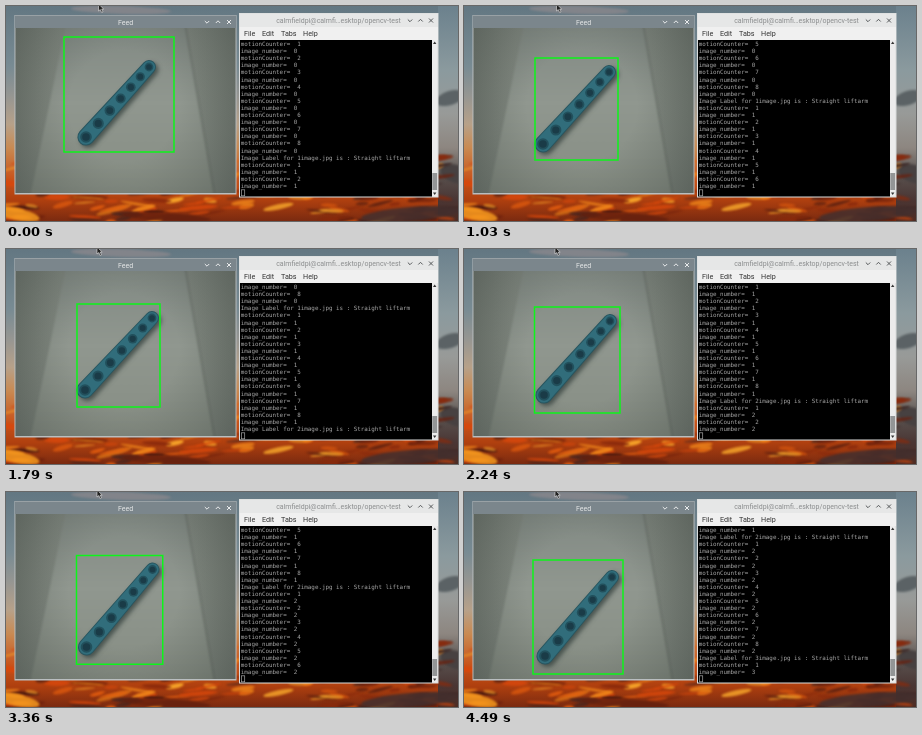
An HTML page with a canvas that plays this animation: 452x215 px, repeating every 4.55 s.

```html
<!DOCTYPE html>
<html lang="en">
<head>
<meta charset="utf-8">
<title>Motion feed</title>
<style>
html, body { margin: 0; width: 100%; height: 100%; overflow: hidden; background: #6f8088; }
canvas { display: block; width: 452px; height: 215px; }
</style>
</head>
<body>
<canvas id="stage" width="452" height="215"></canvas>
<script>
const W = 452, H = 215, LOOP = 4550;
const ctx = document.getElementById('stage').getContext('2d');
const UI = 'Roboto, "Open Sans", sans-serif';
const MONO = '"DejaVu Sans Mono", "Liberation Mono", monospace';

// Console output: eight counts per picture, then a slower labelling step.
// Each count is one camera frame, so the feed refreshes on the same ticks.
const STEP = 245, LABEL = 300;
const log = [], ticks = [];
let clock = 223 - STEP * 10 - LABEL;
for (let n = 0; n < 4; n++) {
  for (let k = 1; k <= (n < 3 ? 8 : 1); k++) {
    log.push({ at: clock, text: 'motionCounter=  ' + k });
    log.push({ at: clock, text: 'image_number=  ' + n });
    ticks.push(clock);
    clock += STEP;
  }
  if (n < 3) {
    clock += LABEL - STEP;
    log.push({ at: clock, text: `Image Label for ${n + 1}image.jpg is : Straight liftarm` });
    clock += STEP;
  }
}

// tick, detection box (left, top, right, bottom), arm ends (low x, y, high x, y)
const poses = [
  [9, 58, 31, 168, 146, 80, 131, 143, 61],
  [10, 71, 47, 154, 148, 80, 133, 144, 62],
  [13, 71, 52, 154, 154, 79, 138, 145, 66],
  [15, 71, 55, 154, 158, 79, 141, 146, 69],
  [17, 70.5, 58, 156, 164, 80, 146, 146, 72],
  [19, 71, 62, 155.5, 169.5, 80, 152, 146, 76],
  [23, 70, 65, 158, 175, 81, 158, 147, 79],
  [24, 69, 68, 159, 182, 81, 164, 148, 85]
].map(([i, ...p]) => [ticks[i], ...p]);

function poseAt(t) {
  const now = ticks.filter(at => at <= t).pop();
  const i = poses.findIndex(p => p[0] > now);
  if (i < 0) return poses[poses.length - 1].slice(1);
  const a = poses[i - 1], b = poses[i];
  const u = (now - a[0]) / (b[0] - a[0]);
  return a.map((v, k) => v + (b[k] - v) * u).slice(1);
}

function layer(paint) {
  const c = document.createElement('canvas');
  c.width = W;
  c.height = H;
  paint(c.getContext('2d'));
  return c;
}

function ramp(g, x0, y0, x1, y1, stops) {
  const grad = g.createLinearGradient(x0, y0, x1, y1);
  stops.forEach(([p, c]) => grad.addColorStop(p, c));
  return grad;
}

function rect(g, x, y, w, h, fill) {
  g.fillStyle = fill;
  g.fillRect(x, y, w, h);
}

function poly(g, pts, fill) {
  g.beginPath();
  pts.forEach(([x, y]) => g.lineTo(x, y));
  g.closePath();
  g.fillStyle = fill;
  g.fill();
}

function label(g, text, x, y, size, color, family = UI, align = 'left') {
  g.font = `${size}px ${family}`;
  g.textAlign = align;
  g.fillStyle = color;
  g.fillText(text, x, y);
}

function buttons(g, xs, y, color) {
  g.strokeStyle = color;
  g.lineWidth = 1;
  g.beginPath();
  [[xs[0], 1], [xs[1], -1]].forEach(([x, s]) => {
    g.moveTo(x - 2.2, y - s);
    g.lineTo(x, y + s * 1.2);
    g.lineTo(x + 2.2, y - s);
  });
  const x = xs[2];
  g.moveTo(x - 2, y - 2);
  g.lineTo(x + 2, y + 2);
  g.moveTo(x + 2, y - 2);
  g.lineTo(x - 2, y + 2);
  g.stroke();
}

function sky(g) {
  rect(g, 0, 0, W, H, ramp(g, 0, 0, 0, H, [
    [0, '#637782'], [0.28, '#788b93'], [0.42, '#969692'], [0.55, '#b7a189'],
    [0.66, '#c98a52'], [0.8, '#c9551c'], [0.9, '#b0400f'], [1, '#7a2a10']
  ]));
  rect(g, 432, 0, 20, H, ramp(g, 0, 0, 0, H, [
    [0, '#6b818d'], [0.3, '#8b9a9e'], [0.5, '#989a98'], [0.66, '#8d8680'],
    [0.78, '#5a5350'], [0.9, '#4a3634'], [1, '#4d2c24']
  ]));

  let seed = 41;
  const rnd = () => (seed = (seed * 16807) % 2147483647) / 2147483647;
  const cloud = (x, y, rx, ry, tilt, fill) => {
    g.beginPath();
    g.ellipse(x, y, rx, ry, tilt, 0, Math.PI * 2);
    g.fillStyle = fill;
    g.fill();
  };
  g.filter = 'blur(.8px)';
  cloud(115, 4, 50, 4, 0.03, '#82848a');
  cloud(444, 92, 15, 7, -0.3, '#5b6265');
  cloud(450, 168, 16, 9, 0.3, '#474141');

  // Streaks run from bright on the left to dark on the right
  const bright = ['#f2881a', '#e85f0e', '#f7a52a', '#d8480c'];
  const dark = ['#4a1a10', '#6b1e0c', '#3a2422', '#8a2a0c'];
  for (let i = 0; i < 200; i++) {
    const x = rnd() * 436, y = 150 + rnd() * 68;
    const set = rnd() < 0.25 + 0.5 * x / W ? dark : bright;
    g.globalAlpha = 0.55 + rnd() * 0.4;
    cloud(x, y, 5 + rnd() * 15, 0.8 + rnd() * 2.2, -0.3 + rnd() * 0.5,
      set[Math.floor(rnd() * 4)]);
  }
  g.globalAlpha = 0.85;
  cloud(10, 208, 24, 6, 0.2, '#f5991f');
  cloud(405, 208, 50, 7, -0.08, '#43302e');
  cloud(160, 211, 45, 4, 0.06, '#64200f');
  g.globalAlpha = 1;
  g.filter = 'none';
}

function feedWindow(g) {
  rect(g, 8.5, 9, 222, 179.5, '#b9bec0');
  rect(g, 9, 9.5, 221, 12.5, '#7b868c');
  label(g, 'Feed', 119.5, 18.6, 7, '#e6e8e8', UI, 'center');
  buttons(g, [201, 212, 223], 16, '#e9ebec');

  g.save();
  g.beginPath();
  g.rect(9.5, 22, 220, 165);
  g.clip();
  rect(g, 9, 22, 221, 166, ramp(g, 9, 0, 230, 0, [
    [0, '#747b73'], [0.2, '#80877f'], [0.75, '#828981'], [1, '#757c74']
  ]));
  g.filter = 'blur(1px)';
  poly(g, [[60, 18], [179, 18], [209, 192], [24, 192]], ramp(g, 0, 22, 0, 187, [
    [0, '#828a84'], [0.45, '#90978f'], [1, '#868d83']
  ]));
  g.strokeStyle = 'rgba(70,76,72,.4)';
  g.lineWidth = 1.2;
  g.beginPath();
  g.moveTo(179, 18);
  g.lineTo(209, 192);
  g.stroke();
  g.filter = 'none';
  const shade = g.createRadialGradient(118, 100, 55, 118, 100, 150);
  shade.addColorStop(0, 'rgba(50,58,54,0)');
  shade.addColorStop(1, 'rgba(50,58,54,.4)');
  rect(g, 9, 22, 221, 166, shade);
  g.restore();
}

function terminal(g) {
  rect(g, 233, 7, 199.5, 184.5, '#d9dbdb');
  rect(g, 233.5, 7.5, 198.5, 13.5, '#e6e7e7');
  rect(g, 233.5, 21, 198.5, 13, '#f0f0f0');
  label(g, 'calmfieldpi@calmfi…esktop/opencv-test', 332.5, 17, 7, '#8b8d8e', UI, 'center');
  buttons(g, [404, 414.5, 425], 14.5, '#55585a');
  [['File', 238], ['Edit', 256], ['Tabs', 275], ['Help', 297]]
    .forEach(([s, x]) => label(g, s, x, 30, 7.2, '#333'));
  rect(g, 234, 34, 192, 156.5, '#000');
  rect(g, 426, 34, 5.5, 156.5, '#ececec');
  rect(g, 426.3, 167, 4.8, 17, '#939596');
  poly(g, [[427, 38], [428.7, 35.5], [430.4, 38]], '#333');
  poly(g, [[427, 186.5], [428.7, 189], [430.4, 186.5]], '#333');
}

const scene = layer(g => {
  sky(g);
  feedWindow(g);
  terminal(g);
});

function arm(x0, y0, x1, y1) {
  const tilt = Math.atan2(y1 - y0, x1 - x0);
  const body = (r0, r1, fill) => {
    ctx.beginPath();
    ctx.arc(x0, y0, r0, tilt + Math.PI / 2, tilt - Math.PI / 2);
    ctx.arc(x1, y1, r1, tilt - Math.PI / 2, tilt + Math.PI / 2);
    ctx.closePath();
    ctx.fillStyle = fill;
    ctx.fill();
  };
  ctx.save();
  ctx.shadowColor = 'rgba(45,58,56,.7)';
  ctx.shadowBlur = 4;
  ctx.shadowOffsetX = 2.5;
  ctx.shadowOffsetY = 2.5;
  body(8.6, 7, '#28555f');
  ctx.restore();
  body(7.6, 6.1, '#316d7b');
  for (let i = 0; i < 7; i++) {
    // Holes crowd together towards the far end
    const v = i / 6, u = v * (1.2 - 0.2 * v), r = 5.8 - 1.4 * u;
    const x = x0 + (x1 - x0) * u, y = y0 + (y1 - y0) * u;
    [[r, '#22505c'], [r * 0.65, '#1a3b47']].forEach(([size, fill]) => {
      ctx.beginPath();
      ctx.arc(x, y, size, 0, Math.PI * 2);
      ctx.fillStyle = fill;
      ctx.fill();
    });
  }
}

function pointer(x) {
  poly(ctx, [[x, -2], [x, 5], [x + 1.8, 3.6], [x + 3.2, 6.5], [x + 4.5, 5.9],
    [x + 3.2, 3.1], [x + 5.2, 3]], '#222');
  ctx.strokeStyle = '#e6e6e6';
  ctx.lineWidth = 0.6;
  ctx.stroke();
}

function draw(t) {
  ctx.drawImage(scene, 0, 0);
  const [left, top, right, bottom, ...ends] = poseAt(t);
  arm(...ends);
  ctx.strokeStyle = '#0cf51a';
  ctx.lineWidth = 1.5;
  ctx.strokeRect(left, top, right - left, bottom - top);

  log.filter(l => l.at <= t).slice(-21).forEach((l, i) =>
    label(ctx, l.text, 234.8, 40 + i * 7.1, 5.86, '#a6a6a6', MONO));
  ctx.strokeStyle = '#a6a6a6';
  ctx.lineWidth = 0.7;
  ctx.strokeRect(235.5, 183.8, 3.2, 6);
  pointer(t < 1790 ? 92.5 : 91);
}

const start = performance.now();
function tick() {
  draw((performance.now() - start) % LOOP);
  requestAnimationFrame(tick);
}
tick();
</script>
</body>
</html>
```
